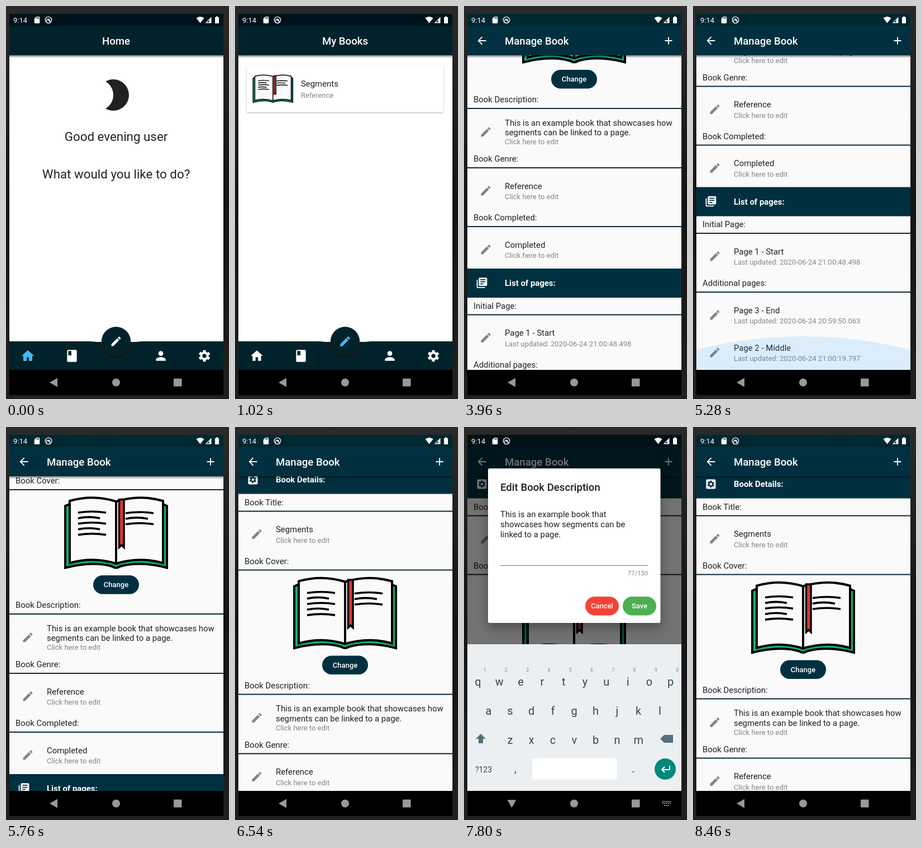
An HTML page for the animation above (9.18 s loop, 399 px wide and 702 px high).

```html
<!DOCTYPE html>
<html lang="en">
<head>
<meta charset="utf-8">
<title>Book manager walkthrough</title>
<style>
  html, body { margin: 0; width: 100%; height: 100%; overflow: hidden; background: #1b1b1b; }
  svg { display: block; width: 399px; height: 702px; font-family: Roboto, sans-serif; }
  text { white-space: pre; }
  .bar { font-size: 18.6px; font-weight: 500; fill: #fff; }
  .greet { font-size: 22.37px; fill: #212121; text-anchor: middle; }
  .body { font-size: 14.9px; fill: #212121; }
  .sub { font-size: 13px; fill: #858585; }
  .band { font-size: 14.9px; font-weight: 700; fill: #fff; }
  .button { font-size: 13px; font-weight: 500; fill: #fff; text-anchor: middle; }
  .key { font-size: 20px; fill: #37474f; text-anchor: middle; }
  .hint { font-size: 9px; fill: #78909c; text-anchor: middle; }
  #fab { filter: drop-shadow(0 3px 2px #0006); }
  #dialog { filter: drop-shadow(0 8px 10px #0005); }
  .card { filter: drop-shadow(0 1px 1px #0005); }
</style>
</head>
<body>
<svg id="stage" viewBox="0 0 399 702"></svg>
<script>
const LOOP = 9180, STEP = 60, BLUE = '#40b8fc', TEAL = '#003040', DARK = '#00232b';

const PATHS = {
  moon: 'M10 2c-1.82 0-3.53.5-5 1.35C7.99 5.08 10 8.3 10 12s-2.01 6.92-5 8.65C6.47 21.5 8.18 22 10 22c5.52 0 10-4.48 10-10S15.52 2 10 2z',
  home: 'M10 20v-6h4v6h5v-8h3L12 3 2 12h3v8z',
  notebook: 'M18 2H6c-1.1 0-2 .9-2 2v16c0 1.1.9 2 2 2h12c1.1 0 2-.9 2-2V4c0-1.1-.9-2-2-2zM6 4h5v8l-2.5-1.5L6 12z',
  person: 'M12 12a4 4 0 1 0 0-8 4 4 0 0 0 0 8zM12 14c-2.7 0-8 1.3-8 4v2h16v-2c0-2.7-5.3-4-8-4z',
  pencil: 'M3 17.25V21h3.75L17.8 9.94l-3.75-3.75zM20.7 7.04c.4-.4.4-1.02 0-1.41l-2.34-2.34c-.4-.4-1.02-.4-1.41 0l-1.83 1.83 3.75 3.75z',
  back: 'M20 11H7.83l5.59-5.59L12 4l-8 8 8 8 1.41-1.41L7.83 13H20z',
  plus: 'M19 13h-6v6h-2v-6H5v-2h6V5h2v6h6z',
  pages: 'M4 6H2v14a2 2 0 0 0 2 2h14v-2H4zM20 2H8a2 2 0 0 0-2 2v12c0 1.1.9 2 2 2h12a2 2 0 0 0 2-2V4a2 2 0 0 0-2-2zM19 11H9V9h10zM15 15H9v-2h6zM19 7H9V5h10z',
  card: 'M18 2h-8L4 8v12c0 1.1.9 2 2 2h12c1.1 0 2-.9 2-2V4c0-1.1-.9-2-2-2zM12 8h-2V4h2zM15 8h-2V4h2zM18 8h-2V4h2z'
};

const place = (x, y, k, inner) => `<g transform="translate(${x} ${y}) scale(${k}) translate(-12 -12)">${inner}</g>`;
const icon = (name, x, y, k = .932, fill = '#fff', attrs = '') =>
  place(x, y, k, `<path d="${PATHS[name]}" fill="${fill}" fill-rule="evenodd" ${attrs}/>`);
const gear = (x, y, k, color) => place(x, y, k,
  `<g fill="none" stroke="${color}" transform="rotate(-106.5 12 12)"><circle cx="12" cy="12" r="5.25" stroke-width="3.7"/>
   <circle cx="12" cy="12" r="8" stroke-width="3" stroke-dasharray="4.6 3.778"/></g>`);
const text = (cls, x, y, str, attrs = '') => `<text class="${cls}" x="${x}" y="${y}" ${attrs}>${str}</text>`;
const rect = (x, y, w, h, fill, r = 0) => `<rect x="${x}" y="${y}" width="${w}" height="${h}" rx="${r}" fill="${fill}"/>`;
const pill = (x, y, w, fill, label) => rect(x, y, w, 33.5, fill, 16.75) + text('button', x + w / 2, y + 21.4, label);

const appBar = (status, color) => rect(6, 88, 383, 5, 'url(#shade)') + rect(6, 14, 383, 22, status) + rect(6, 36, 383, 52, color);
const label = (y, str) => text('body', 17, y + 5, str) + rect(6, y + 15, 383, 2, '#0b2a3a');
const row = (y, title, sub = 'Click here to edit') =>
  icon('pencil', 39, y + 8.5, .95, '#858585') + text('body', 73, y + 5, title) + text('sub', 73, y + 23.5, sub);
const field = (y, name, ...rest) => label(y, name) + row(y + 48.5, ...rest);
const band = (y, str) => rect(6, y, 383, 52, TEAL) + text('band', 73, y + 31, str);
const stamp = time => `Last updated: 2020-06-24 ${time}`;

function book() {
  const line = (x, y, w) => `M${x} ${y + 1}q${w / 2} -4 ${w} 0`;
  const left = [50, 39, 50, 39, 50].map((w, i) => line(129, 316 + i * 9.9, w));
  const right = [50, 40, 50].map((w, i) => line(214, 317 + i * 9.9, w));
  return `<g id="book" stroke="#000" stroke-width="4">
    <path fill="#12b07c" d="M106 305V415.500Q155 403 190 413Q197 418 204 413Q240 403 288 415.500V305L281 302H113Z"/>
    <path fill="#fafafa" d="M114 296Q156 284 197 297Q239 284 281 296V407Q239 395 197 408Q156 395 114 407Z"/>
    <path d="M197 296V408"/>
    <path fill="#e53338" stroke-width="3.500" d="M202.500 293.500H211V379L206.700 375L202.500 379Z"/>
    <path fill="none" stroke-width="3.600" d="${left.join('')}${right.join('')}"/></g>`;
}

const homeView = () => rect(6, 88, 383, 512, '#fff') +
  text('bar', 197, 69, 'Home', 'text-anchor="middle"') +
  icon('moon', 197.600, 159, 2.796, '#212121') +
  text('greet', 197, 241, 'Good evening user') + text('greet', 197, 308, 'What would you like to do?');

const libraryView = () => rect(6, 88, 383, 512, '#fff') + rect(6, 36, 383, 52, DARK) +
  text('bar', 197, 69, 'My Books', 'text-anchor="middle"') +
  `<g class="card">${rect(21, 106, 352, 84, '#fff', 4)}</g>
   <use href="#book" transform="translate(-9 10) scale(.39)"/>` +
  text('body', 118, 144, 'Segments') + text('sub', 118, 164, 'Reference');

const tabBar = () => `
  <path fill="${DARK}" d="M6 599H150Q165.500 599 167 605A31 31 0 0 0 227 605Q228.500 599 244 599H389V650H6Z"/>
  <circle id="fab" cx="197" cy="599" r="26" fill="${DARK}"/>` +
  icon('pencil', 197, 599) + icon('pencil', 197, 599, .932, BLUE, 'id="pencilOn"') +
  icon('home', 39, 625, 1.087) + icon('home', 39, 625, 1.087, BLUE, 'id="homeOn"') +
  icon('notebook', 118, 625, 1.087) + icon('person', 277, 625, 1.087) + gear(355, 625, 1.087, '#fff');

const details = () => band(88, 'Book Details:') +
  rect(23.500, 106, 17, 17, '#fff', 2) + gear(32, 114.500, .66, TEAL) +
  field(155, 'Book Title:', 'Segments') + label(260, 'Book Cover:') + book() +
  pill(156, 429, 82, TEAL, 'Change') + label(482, 'Book Description:') +
  icon('pencil', 39, 540, .95, '#858585') +
  text('body', 73, 528.500, 'This is an example book that showcases how') +
  text('body', 73, 546, 'segments can be linked to a page.') + text('sub', 73, 562, 'Click here to edit') +
  field(588, 'Book Genre:', 'Reference') + field(693, 'Book Completed:', 'Completed') +
  band(784, 'List of pages:') + icon('pages', 32, 809.500, .932) +
  field(850.500, 'Initial Page:', 'Page 1 - Start', stamp('21:00:48.498')) +
  field(955.500, 'Additional pages:', 'Page 3 - End', stamp('20:59:50.063')) +
  row(1071, 'Page 2 - Middle', stamp('21:00:19.797'));

const managePage = () => rect(6, 14, 383, 637, '#fafafa') +
  `<g clip-path="url(#list)"><g id="scroll">${details()}</g>
   <circle id="glow" cx="197.500" cy="1362" r="772" fill="#2196f3"/></g>` +
  appBar('#002832', TEAL) + icon('back', 32, 62) + icon('plus', 366, 62) + text('bar', 73, 69, 'Manage Book');

const dialog = () => rect(43, 205, 308.500, 276, '#fff', 3) + text('bar', 65, 245, 'Edit Book Description', 'style="fill:#212121"') +
  ['This is an example book that', 'showcases how segments can be', 'linked to a page. ']
    .map((s, i) => text('body', 65, 292 + i * 18, s)).join('') +
  `<rect id="caret" x="177" y="314" width="2" height="18" fill="#3f7fe0"/>` + rect(65, 378, 264, 1, '#757575') +
  text('sub', 329, 396, '77/150', 'text-anchor="end" style="font-size:11.2px"') +
  pill(217, 434, 60, '#f44336', 'Cancel') + pill(284, 434, 60, '#4caf50', 'Save');

function keyboard() {
  const keys = (str, y, x0) => [...str].map((c, i) => text('key', x0 + i * 38.3, y, c)).join('');
  const hints = [...'1234567890'].map((c, i) => text('hint', 37 + i * 38.3, 437, c)).join('');
  return rect(6, 388, 383, 262, '#eceff1') + hints +
    keys('qwertyuiop', 462, 25) + keys('asdfghjkl', 514, 44) + keys('zxcvbnm', 566, 82.500) +
    `<path d="M30 548l9 9h-5v8h-8v-8h-5zM358 550h16v14h-16l-7-7z" fill="#546e7a"/>` +
    rect(122, 592, 152, 38, '#fff', 4) +
    text('key', 35, 617, '?123', 'style="font-size:14px"') + text('key', 92, 617, ',') + text('key', 303, 617, '.') +
    `<circle cx="360" cy="611" r="19" fill="#00897b"/>
     <path d="M368 605v7h-14m5-5l-5 5 5 5" fill="none" stroke="#fff" stroke-width="2"/>`;
}

const statusIcons = () => text('sub', 13, 30, '9:14', 'style="fill:#fff"') + icon('card', 55.500, 25, .6) + `
  <g fill="none" stroke="#fff" stroke-width="1.300"><circle cx="76" cy="25" r="5.700"/>
  <path d="M73 28a3 3 0 1 1 5.500-1M75 24l5 5"/></g>
  <g fill="#fff"><path d="M340.500 21.500Q347.500 16.500 354.500 21.500L347.500 30.500Z"/>
  <path d="M356.500 30.500H367.500V19.500ZM363.500 25V29H359.500Z" fill-rule="evenodd"/>
  <path d="M374 20h2v-1.500h3V20h2v11h-7z"/></g>`;

const systemBar = () => rect(6, 650, 383, 45, '#000') + `<g fill="#999">
  <path id="backKey" d="M78 672.500L92 664.500V680.500Z"/><circle cx="197" cy="672.500" r="7"/>
  ${rect(300, 665.500, 14.500, 14, '#999', 1)}
  <path id="imeKey" d="M355 669h16M355 672h16M358 676h10" fill="none" stroke="#999" stroke-width="2" stroke-dasharray="2 1.300"/></g>`;

document.getElementById('stage').innerHTML = `
  <defs>
    <clipPath id="phone"><path d="M6 14H389V650H6Z"/></clipPath>
    <clipPath id="list"><path d="M6 88H389V650H6Z"/></clipPath>
    <linearGradient id="shade" x2="0" y2="1"><stop stop-color="#0007"/><stop offset="1" stop-color="#0000"/></linearGradient>
    <linearGradient id="desk" x2="0" y2="1"><stop stop-color="#2a2a2a"/><stop offset=".5" stop-color="#141414"/><stop offset="1" stop-color="#202020"/></linearGradient>
  </defs>
  ${rect(0, 0, 399, 702, 'url(#desk)')}
  <g clip-path="url(#phone)">
    <g id="tabs">${homeView()}${appBar('#00131c', DARK)}${text('bar', 197, 69, 'Home', 'text-anchor="middle"')}
      <g id="library">${libraryView()}${rect(6, 88, 383, 5, 'url(#shade)')}</g>${tabBar()}</g>
    <g id="manage">${managePage()}</g>
    <rect id="barrier" x="6" y="14" width="383" height="636"/>
    <g id="dialogFade"><g id="dialog">${dialog()}</g></g>
    <g id="keyboard">${keyboard()}</g>
  </g>
  ${statusIcons()}${systemBar()}`;

const clamp = x => Math.min(1, Math.max(0, x));
const span = (t, a, b) => clamp((t - a) / (b - a));
const linear = p => p;
const easeOut = p => 1 - (1 - p) ** 3;
const smooth = p => p * p * (3 - 2 * p);

// start, end, distance, easing
const scrolls = [
  [3660, 3960, 315, linear], [3960, 4320, 105, easeOut], [4680, 4980, 40.5, easeOut],
  [5280, 5760, -296.5, easeOut], [6240, 6720, -151.5, easeOut]
];

const el = id => document.getElementById(id);
const fade = (id, o) => { el(id).style.opacity = o; el(id).style.display = o > 0 ? '' : 'none'; };
const shift = (id, y) => el(id).setAttribute('transform', `translate(0 ${y})`);

function draw(t) {
  const tab = span(t, 720, 1020);
  fade('library', tab);
  fade('pencilOn', tab);
  fade('homeOn', 1 - tab);

  const open = span(t, 2460, 2820);
  fade('manage', open ** 1.5);
  shift('manage', 160 * (1 - easeOut(open)));
  shift('scroll', -scrolls.reduce((s, [a, b, d, ease]) => s + d * ease(span(t, a, b)), 0));
  fade('glow', .14 * span(t, 5100, 5220) * (1 - span(t, 5280, 5580)));

  const closing = 1 - span(t, 8100, 8280);
  const lift = smooth(span(t, 7260, 7560)) * (1 - smooth(span(t, 8100, 8460)));
  fade('barrier', (t >= 7260 ? .5 + .04 * span(t, 7260, 7320) : 0) * closing);
  fade('dialogFade', (t >= 7260 ? .75 + .25 * span(t, 7260, 7320) : 0) * closing);
  shift('dialog', -131 * lift);
  fade('caret', t < 7800 ? 1 : 0);
  fade('keyboard', lift > 0 ? 1 : 0);
  shift('keyboard', 262 * (1 - lift));
  fade('imeKey', t >= 7260 && t < 8460 ? 1 : 0);
  el('backKey').setAttribute('transform', t >= 7320 && t < 8280 ? 'rotate(-90 85.5 672.5)' : '');
}

function tick() {
  const t = performance.now() % LOOP;
  draw(Math.floor(t / STEP) * STEP);
  requestAnimationFrame(tick);
}
tick();
</script>
</body>
</html>
```
